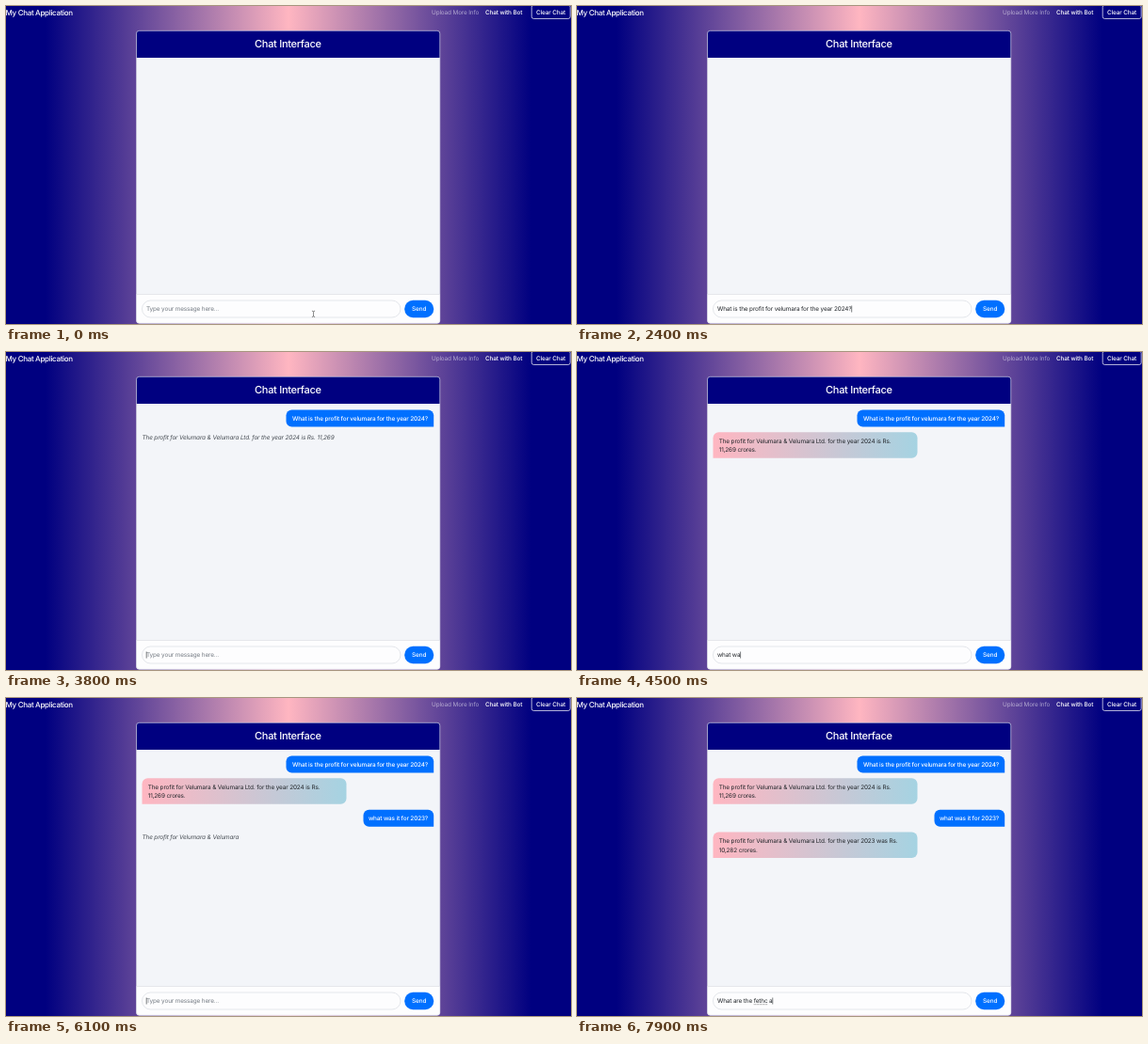
Write an HTML page that moves like this. It is 600 px wide and 338 px high and loops after 8000 ms.

```html
<!DOCTYPE html>
<html lang="en">
<head>
<meta charset="utf-8">
<title>Chat</title>
<style>
  html, body { margin: 0; width: 100%; height: 100%; overflow: hidden; }
  body { background: linear-gradient(to right, #000080 7%, #ffb6c1 50%, #000080 93%); }
  svg { display: block; width: 600px; height: 338px; }
  text {
    font: 6.4px Inter, Roboto, sans-serif; letter-spacing: -.13px;
    white-space: pre; text-rendering: geometricPrecision; fill: #212529;
  }
  .light { fill: #fff; }
  .medium { font-weight: 500; }
  .end { text-anchor: end; }
  .mid { text-anchor: middle; }
  #brand { font-size: 8px; letter-spacing: -.32px; }
  #title { font-size: 11px; letter-spacing: -.3px; }
  #status { font-style: italic; fill: #454b52; }
</style>
</head>
<body>
<svg viewBox="0 0 600 338">
  <defs>
    <linearGradient id="reply">
      <stop stop-color="#ffb6c1"/><stop offset="1" stop-color="#a5d3e2"/>
    </linearGradient>
  </defs>

  <text id="brand" class="light medium" x="-.5" y="9.6">My Chat Application</text>
  <text x="452" y="9" class="light" opacity=".55">Upload More Info</text>
  <text x="509" y="9" class="light medium">Chat with Bot</text>
  <rect x="558.2" y="-1" width="41" height="14.5" rx="2.3" fill="none" stroke="#fff" stroke-width=".7"/>
  <text x="563" y="9" class="light medium">Clear Chat</text>

  <rect x="138.5" y="26.3" width="322.3" height="311" rx="3" fill="#f3f5f9"/>
  <path d="M138.5 55V29.3a3 3 0 0 1 3-3h316.300a3 3 0 0 1 3 3V55z" fill="#000080"/>
  <path d="M138.500 306.500H460.800V334.300a3 3 0 0 1-3 3H141.500a3 3 0 0 1-3-3z" fill="#fdfdfe"/>
  <path d="M138.500 306.500H460.800" stroke="#d9dce1" stroke-width=".6"/>
  <rect x="138.5" y="26.3" width="322.3" height="311" rx="3" fill="none" stroke="#d3d4e2" stroke-width=".6"/>
  <text id="title" class="light medium mid" x="299.400" y="43.500">Chat Interface</text>

  <rect x="144.500" y="313" width="274.500" height="18" rx="9" fill="#fdfdfe" stroke="#d3d7dd" stroke-width=".6"/>
  <rect x="423.200" y="312.800" width="31" height="18.400" rx="9" fill="#0070ff"/>
  <text class="light medium mid" x="438.700" y="324.300">Send</text>

  <g id="log"></g>
  <text id="status" x="144.500"></text>
  <text id="input" x="149" y="324.300"></text>
  <path id="typo" stroke="#666" stroke-width=".6" stroke-dasharray="1 .5"/>
  <path id="caret" d="M0 318.500v7" stroke="#212529" stroke-width=".6"/>
  <path id="mouse" d="M-1.600-3.200Q0-3.200 0-2Q0-3.200 1.600-3.200M0-2V2M-1.600 3.200Q0 3.200 0 2Q0 3.200 1.600 3.200" fill="none" stroke="#444" stroke-width=".6"/>
</svg>
<script>
const $ = id => document.getElementById(id);
const LOOP = 8000;
const HINT = 'Type your message here...';

// "<" is a backspace
const drafts = [
  { start: 100, send: 2450, step: 42, keys: 'What is the profit fr<or velumara for the year 2024?' },
  { start: 4180, send: 5200, step: 44, keys: 'what was it for 2023?' },
  { start: 7000, send: LOOP, step: 44, keys: 'What are the fethc a' }
];
const replies = [
  { wait: 2550, start: 3370, done: 3900, y: 92.5,
    lines: ['The profit for Velumara & Velumara Ltd. for the year 2024 is Rs.', '11,269 crores.'] },
  { wait: 5250, start: 5900, done: 6400, y: 150,
    lines: ['The profit for Velumara & Velumara Ltd. for the year 2023 was Rs.', '10,282 crores.'] }
];
const escape = s => s.replace(/&/g, '&amp;');
const typed = keys => [...keys].reduce((s, k) => k === '<' ? s.slice(0, -1) : s + k, '');
const show = (el, on) => el.setAttribute('visibility', on ? 'visible' : 'hidden');

function userBubble(x, y, text) {
  const h = 18;
  return `<path d="M${x + 6} ${y}H448.200a6 6 0 0 1 6 6V${y + h}H${x + 6}a6 6 0 0 1-6-6V${y + 6}a6 6 0 0 1 6-6z" fill="#0070ff"/>
    <text class="light medium end" x="448.100" y="${y + 11.3}">${text}</text>`;
}
function replyBubble(y, lines) {
  return `<path d="M150.500 ${y}H355.500a6 6 0 0 1 6 6v15.600a6 6 0 0 1-6 6H144.500V${y + 6}a6 6 0 0 1 6-6z" fill="url(#reply)"/>` +
    lines.map((s, i) => `<text x="150.700" y="${y + 11.4 + i * 9.6}">${escape(s)}</text>`).join('');
}
const bubbles = [
  [drafts[0].send, userBubble(297.5, 61.5, typed(drafts[0].keys))],
  [replies[0].done, replyBubble(85.2, replies[0].lines)],
  [drafts[1].send, userBubble(379.5, 118.7, typed(drafts[1].keys))],
  [replies[1].done, replyBubble(142.5, replies[1].lines)]
];
$('log').innerHTML = bubbles.map(b => `<g>${b[1]}</g>`).join('');

function drawInput(t) {
  const input = $('input');
  const draft = drafts.find(d => t >= d.start + d.step && t < d.send);
  const value = draft ? typed(draft.keys.slice(0, Math.floor((t - draft.start) / draft.step))) : '';
  input.textContent = value || HINT;
  input.style.fill = value ? '#212529' : '#747b83';

  const left = n => 149 + (n ? input.getSubStringLength(0, n) : 0);
  $('caret').setAttribute('transform', `translate(${left(value.length) + .2})`);
  show($('caret'), value || t > 100 && Math.floor(t / 300) % 2 === 0);

  const at = value.indexOf('fethc ');
  show($('typo'), at >= 0);
  if (at >= 0) $('typo').setAttribute('d', `M${left(at)} 325.700H${left(at + 5)}`);
}

function drawStatus(t) {
  const reply = replies.find(r => t >= r.wait && t < r.done);
  show($('status'), reply);
  if (!reply) return;
  const words = reply.lines.join(' ').split(' ');
  const count = Math.floor((t - reply.start) / 30);
  $('status').setAttribute('y', reply.y);
  $('status').textContent = count > 0 ? words.slice(0, count).join(' ') : 'Assistant is typing...';
}

function draw(now) {
  const t = now % LOOP;
  bubbles.forEach((b, i) => show($('log').children[i], t >= b[0]));
  drawInput(t);
  drawStatus(t);
  const late = t > 6450;
  show($('mouse'), t < 150 || late && t < 7050);
  $('mouse').setAttribute('transform', late ? 'translate(264 329.300)' : 'translate(326.500 327.300)');
}

const begin = performance.now();
function tick() {
  draw(performance.now() - begin);
  requestAnimationFrame(tick);
}
tick();
</script>
</body>
</html>
```
